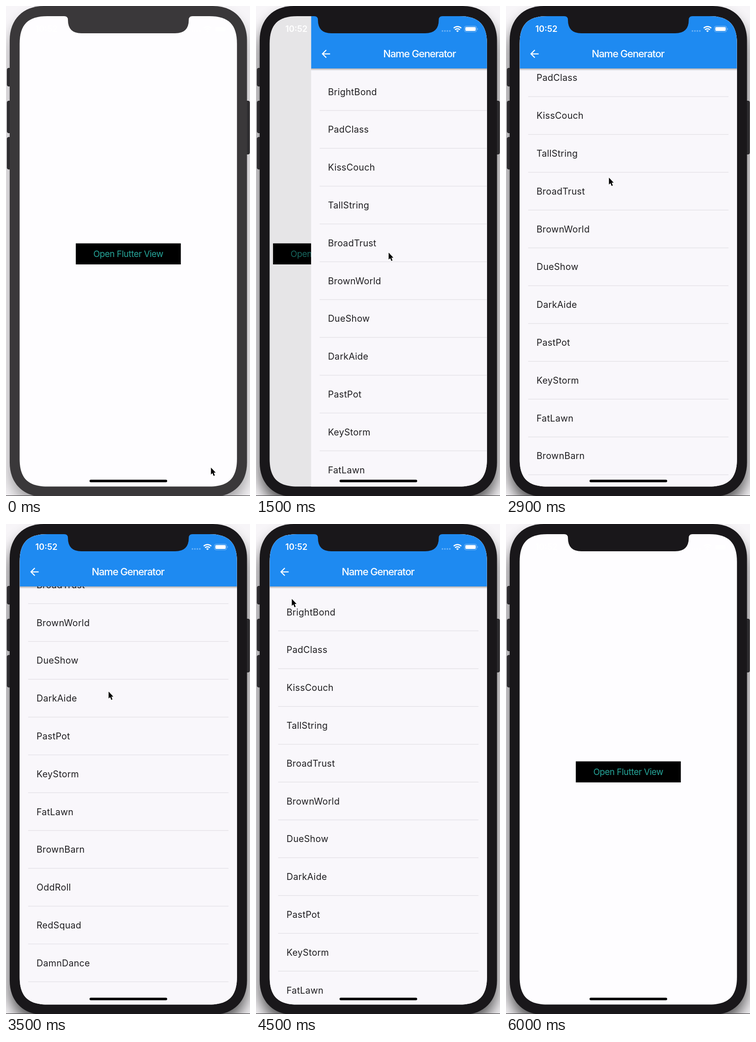
Recreate the animation shown at these times as an HTML page. Size 528x1060 px, loop 6.6 s.

```html
<!DOCTYPE html>
<html lang="en">
<head>
<meta charset="utf-8">
<title>Name Generator</title>
<style>
  html, body { margin: 0; width: 100%; height: 100%; overflow: hidden; background: #f7f5f8; }
  svg { display: block; width: 100%; height: 100%; }
  text { font-family: Inter, "Open Sans", sans-serif; }
  #phone { color: #3a383a; }
  #phone.active { color: #19171a; }
  .body { fill: currentColor; }
  .keys rect { fill: #2e2d30; stroke: #1c1b1d; }
  .names text { font-size: 19.6px; fill: #1f1e21; letter-spacing: .28px; }
  .names rect { fill: #e1dfe4; }
</style>
</head>
<body>
<svg viewBox="0 0 528 1060" preserveAspectRatio="none">
  <defs>
    <clipPath id="screen"><path id="screenShape"/></clipPath>
    <clipPath id="bar"><rect x="29.5" y="22" width="470.3" height="113"/></clipPath>
    <linearGradient id="barShadow" x2="0" y2="1">
      <stop stop-opacity=".3"/><stop offset="1" stop-opacity="0"/>
    </linearGradient>
    <filter id="soft" x="-20%" y="-10%" width="140%" height="120%"><feGaussianBlur stdDeviation="16"/></filter>
  </defs>

  <g id="phone">
    <rect id="shadow" x="8" y="22" width="513" height="1061" rx="74" filter="url(#soft)"/>
    <g class="keys">
      <rect x="2.5" y="134.5" width="12" height="39" rx="3"/>
      <rect x="2.5" y="205.5" width="12" height="69" rx="3"/>
      <rect x="2.5" y="284" width="12" height="69" rx="3"/>
      <rect x="515" y="205.5" width="12" height="115" rx="3"/>
    </g>
    <rect y="1058.8" width="528" height="1.2" fill="#4a494b"/>
    <path id="bodyShape" class="body"/>

    <g clip-path="url(#screen)">
      <rect x="29" y="21" width="472" height="1020" fill="#fefdff"/>
      <g id="home">
        <rect x="151" y="513.5" width="227.3" height="45.5"/>
        <text id="open" x="264.5" y="543.3" text-anchor="middle" font-size="18.8" letter-spacing="-.45" fill="#26a69a">Open Flutter View</text>
      </g>
      <rect id="dim" x="29" y="21" width="472" height="1020"/>

      <g id="page">
        <rect x="29.5" y="22" width="471" height="1018" fill="#f9f7fb"/>
        <g id="names" class="names"></g>
        <rect x="29.5" y="135" width="471" height="5" fill="url(#barShadow)"/>
        <g clip-path="url(#bar)">
          <rect x="29.5" y="22" width="471" height="114" fill="#1e8af1"/>
          <circle id="ripple" cx="62" cy="103.5" fill="#afaaa5"/>
        </g>
        <path transform="translate(47.9 89.9) scale(1.136)" fill="#fff"
          d="M20 11H7.83l5.59-5.59L12 4l-8 8 8 8 1.41-1.41L7.83 13H20z"/>
        <text x="264" y="111.3" text-anchor="middle" font-size="21.8" letter-spacing="-1.03" font-weight="500" fill="#fff">Name Generator</text>
      </g>

      <g fill="#fff">
        <text x="63.5" y="56" font-size="18.2" font-weight="600">10:52</text>
        <path d="M403.5 54h16" fill="none" stroke="#fff" stroke-width="3.6" stroke-linecap="round" stroke-dasharray="0 5.3" opacity=".35"/>
        <path d="M427.8 47.8a12 12 0 0 1 16.4 0M430.7 51.3a7.8 7.8 0 0 1 10.6 0" fill="none" stroke="#fff" stroke-width="2.4"/>
        <path d="M433.2 53.8a4.2 4.2 0 0 1 5.6 0L436 56.6z"/>
        <rect x="451" y="43.5" width="26.5" height="12.5" rx="3.6" fill="none" stroke="#fff" opacity=".45"/>
        <rect x="453" y="45.5" width="22.5" height="8.5" rx="2"/>
        <path d="M479 47.7q2.5 2 0 4.2z" opacity=".5"/>
      </g>
    </g>

    <path class="body" d="M126 21V22Q134 22 134 30Q134 59 163 59H366Q395.5 59 395.5 30Q395.5 22 403.5 22V21z"/>
    <path d="M183.5 1027.5h162.5" stroke="#000" stroke-width="5.5" stroke-linecap="round"/>
    <path id="cursor" d="M0 0V15L3.4 12 5.8 18 8.4 17 6 11H10.3z"
      stroke="#fff" stroke-width="2.2" paint-order="stroke"/>
  </g>
</svg>

<script>
const LOOP = 6600, SCREEN_W = 470.3, ROW = 81.8;
const NAMES = ["BrightBond", "PadClass", "KissCouch", "TallString", "BroadTrust",
  "BrownWorld", "DueShow", "DarkAide", "PastPot", "KeyStorm", "FatLawn",
  "BrownBarn", "OddRoll", "RedSquad", "DamnDance"];

// Keys: [time, ...values]
const CURSOR = [[20, 443.5, 998.5], [700, 212, 526], [850, 318, 530], [1000, 287, 533.5],
  [1950, 287, 533.5], [2600, 236, 525], [2950, 222, 362.5], [3700, 222, 362.5],
  [4050, 230, 500], [4500, 77.5, 162], [4800, 57.5, 107.5], [5450, 57.5, 107.5], [5990, 290, 527]];
const SCROLL = [[2650, 0], [3350, 381], [3700, 381], [4250, -16], [4650, 0]];
const PUSH_START = 1332, POP_START = 4930.5, SLIDE_MS = 540;

const $ = id => document.getElementById(id);
const clamp = x => Math.min(1, Math.max(0, x));
const smooth = x => x * x * (3 - 2 * x);
const move = (id, x, y) => $(id).setAttribute("transform", `translate(${x} ${y})`);
const fade = (id, alpha) => $(id).setAttribute("opacity", alpha);
const show = (id, visible) => $(id).style.display = visible ? "" : "none";

function track(keys, t) {
  const next = keys.findIndex(key => key[0] > t);
  if (next === 0) return keys[0].slice(1);
  if (next < 0) return keys.at(-1).slice(1);
  const a = keys[next - 1], b = keys[next];
  const k = smooth((t - a[0]) / (b[0] - a[0]));
  return a.slice(1).map((v, i) => v + (b[i + 1] - v) * k);
}

// Navigation easing: cubic-bezier(.36, .66, .04, 1)
function slide(x) {
  const bezier = (s, p, q) => 3 * (1 - s) ** 2 * s * p + 3 * (1 - s) * s * s * q + s ** 3;
  if (x <= 0 || x >= 1) return clamp(x);
  let lo = 0, hi = 1;
  for (let i = 0; i < 24; i++) {
    const mid = (lo + hi) / 2;
    if (bezier(mid, .36, .04) < x) lo = mid; else hi = mid;
  }
  return bezier(lo, .66, 1);
}

// Rectangle whose corners ease gradually into the sides; handle is measured from the corner.
function softRect(id, left, top, right, bottom, size, handle) {
  const bend = size - handle;
  const corner = (x1, y1, x2, y2) =>
    `c${x1 * bend} ${y1 * bend} ${x1 * size - x2 * handle * -1 - x2 * 0 - x2 * 0 - x2 * 0} ${y1 * size + y2 * handle} ${(x1 + x2) * size} ${(y1 + y2) * size}`;
  $(id).setAttribute("d", `M${left} ${top + size}${corner(0, -1, 1, 0)}H${right - size}${corner(1, 0, 0, 1)}` +
    `V${bottom - size}${corner(0, 1, -1, 0)}H${left + size}${corner(-1, 0, 0, -1)}z`);
}

softRect("bodyShape", 8, 0, 521.5, 1061.5, 74, 29);
softRect("screenShape", 29.5, 22, 499.8, 1039.5, 60, 18);

$("names").innerHTML = NAMES.map((name, i) => {
  const y = 185.5 + i * ROW;
  return `<text x="66" y="${y + 7}">${name}</text><rect x="48" y="${y + 40}" width="433.5" height="1.2"/>`;
}).join("");

function draw(t) {
  const active = t >= 1300;
  $("phone").classList.toggle("active", active);
  fade("shadow", active ? .68 : .36);

  const pushed = slide((t - PUSH_START) / SLIDE_MS) - slide((t - POP_START) / SLIDE_MS);
  show("home", pushed < 1);
  move("home", -.3 * SCREEN_W * pushed, 0);
  show("dim", pushed < 1);
  fade("dim", .115 * pushed);
  show("page", pushed > 0);
  move("page", SCREEN_W * (1 - pushed), 0);
  fade("open", active ? .35 + .65 * clamp((t - 1350) / 300) : 1);

  move("names", 0, -track(SCROLL, t)[0]);
  $("ripple").setAttribute("r", 39 * clamp((t - 4740) / 150));
  fade("ripple", .5 * clamp((t - 4740) / 80) * (1 - clamp((t - 5050) / 250)));

  show("cursor", t < 6000);
  move("cursor", ...track(CURSOR, t));
}

function frame() {
  draw(performance.now() % LOOP);
  requestAnimationFrame(frame);
}
frame();
</script>
</body>
</html>
```
